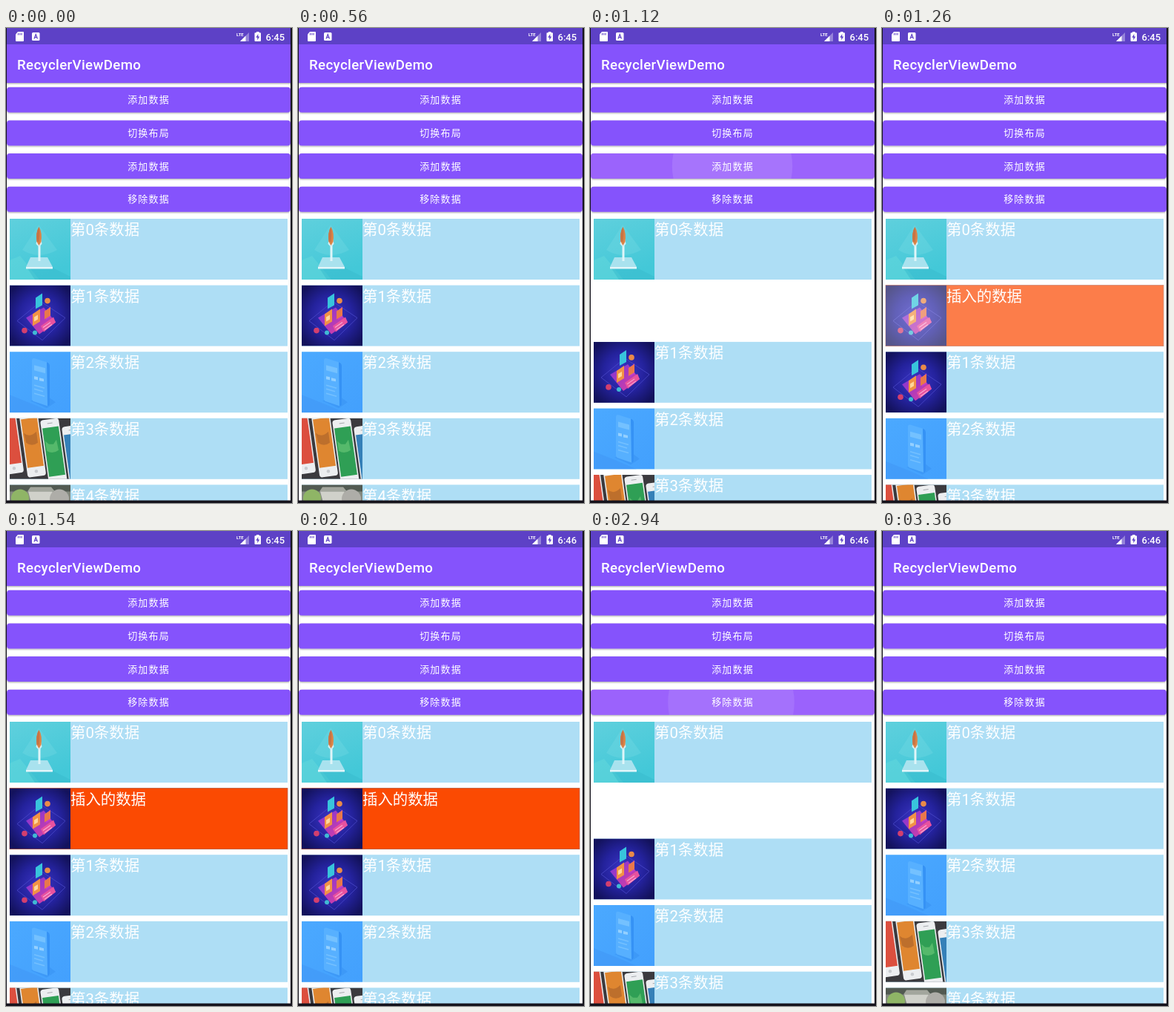
Animation, 386 px wide and 640 px high, one loop 3.43 s. Source, as an HTML page:

```html
<!DOCTYPE html>
<html lang="zh-CN">
<head>
<meta charset="utf-8">
<title>RecyclerViewDemo</title>
<style>
  html, body { margin: 0; width: 100%; height: 100%; overflow: hidden; background: #fff; }
  svg { display: block; width: 386px; height: 640px; }
  text { fill: #fff; font-family: Roboto, "Noto Sans CJK SC", "Noto Sans CJK", sans-serif; }
  .title { font-size: 18.7px; font-weight: 500; letter-spacing: .36px; }
  .label { font-size: 13px; font-weight: 500; letter-spacing: 1.16px; text-anchor: middle; }
  .row { font-size: 20.4px; }
  .clock { font-size: 13px; font-weight: 500; }
</style>
</head>
<body>
<svg viewBox="0 0 386 640" xmlns="http://www.w3.org/2000/svg">
  <defs>
    <filter id="lift" x="-5%" y="-30%" width="110%" height="180%">
      <feDropShadow dx="0" dy="1" stdDeviation="1" flood-color="#000" flood-opacity=".36"/>
    </filter>
    <filter id="soft" x="-5%" y="-40%" width="110%" height="200%"><feGaussianBlur stdDeviation="2.6"/></filter>
    <clipPath id="buttonClip"><rect x="1" width="383" height="34" rx="4"/></clipPath>
    <clipPath id="thumbClip"><rect width="82" height="82"/></clipPath>
    <linearGradient id="teal" x2=".4" y2="1"><stop stop-color="#5fd0dd"/><stop offset="1" stop-color="#43c8d8"/></linearGradient>
    <radialGradient id="night" r=".62"><stop stop-color="#3c36c8"/><stop offset=".55" stop-color="#24229c"/><stop offset="1" stop-color="#13125c"/></radialGradient>
    <linearGradient id="sky" x2="1" y2="1"><stop stop-color="#4ba9ff"/><stop offset="1" stop-color="#43a0fd"/></linearGradient>
    <linearGradient id="pink" x2="1" y2="1"><stop stop-color="#7a35d8"/><stop offset="1" stop-color="#e2409f"/></linearGradient>

    <g id="thumb0">
      <rect width="82" height="82" fill="url(#teal)"/>
      <path d="M0 56L14 50L40 82H0Z" fill="#62d8dc" opacity=".6"/>
      <path d="M39 8L64 42Q39 56 17 42Z" fill="#7adbe3" opacity=".3"/>
      <path d="M58 66L82 78V82H34L24 67Z" fill="#38bccd" opacity=".5"/>
      <path d="M28 52H51L58 65H22Z" fill="#a9e2ee"/>
      <path d="M22 65H58V67.5H22Z" fill="#e3f6fa"/>
      <path d="M38.500 36H41.500V57H38.500Z" fill="#dff5f8"/>
      <path d="M35.500 34L37 26H42L43.500 34L39.500 38Z" fill="#d5eff3"/>
      <path d="M39.500 11Q44 18 42.500 31L39.500 36L36.500 31Q35 18 39.500 11Z" fill="#dc8345"/>
      <path d="M39.500 11Q41 16 39.500 31H36.500Q35 18 39.500 11Z" fill="#c77445"/>
    </g>

    <g id="thumb1">
      <rect width="82" height="82" fill="url(#night)"/>
      <path d="M10 48L42 22L75 44L44 74Z" fill="none" stroke="#4b49c9" stroke-width=".8"/>
      <path d="M22 44L46 30L62 50L40 66Z" fill="url(#pink)"/>
      <path d="M42 55L59 43L62 50L46 63Z" fill="#e8529f"/>
      <path d="M49 34L55 29V43L49 47Z" fill="#c23ccf"/>
      <path d="M35 17L44 11V27L35 32Z" fill="#38c4dc"/>
      <path d="M31 39L41 32V49L31 55Z" fill="#f29245"/>
      <path d="M47 35L55 30V41L47 46Z" fill="#e9784b"/>
      <path d="M33 43L38 40V46L33 49Z" fill="#ffd79a"/>
      <path d="M45 57L55 50M47 60L57 53" stroke="#f6a8d2" stroke-width="1.200"/>
      <circle cx="51" cy="21" r="3.800" fill="#e98a48"/>
      <circle cx="20" cy="61" r="3.800" fill="#d33f6e"/>
      <circle cx="34" cy="64" r="3" fill="#40b9d4"/>
    </g>

    <g id="thumb2">
      <rect width="82" height="82" fill="url(#sky)"/>
      <path d="M0 58L30 70L58 82H0Z" fill="#4096f5" opacity=".5"/>
      <path d="M28 66L50 76L62 68L54 62Z" fill="#3a93f3" opacity=".6"/>
      <path d="M30 12Q30 8 34 9L50 14Q54 15 54 19V71Q54 74 51 73L33 67Q30 66 30 63Z" fill="#57b0ff"/>
      <path d="M50 14Q54 15 54 19V71Q54 74 51 73Z" fill="#3592f5"/>
      <path d="M33 18L48 22V29L33 25Z" fill="#74c1ff"/>
      <path d="M33 33L38 34V38L33 37ZM40 35L46 36.500V40L40 39Z" fill="#94d0ff"/>
      <path d="M33 45L47 49M33 50L45 53.500M33 56L47 60" stroke="#74c0ff" stroke-width="1.500"/>
    </g>

    <g id="phone">
      <rect width="25" height="90" rx="4" fill="#eceef0"/>
      <rect x="1.500" y="11" width="22" height="66"/>
      <path d="M9 5.500H16" stroke="#a5a8ad"/>
      <circle cx="12.500" cy="83" r="2.300" fill="#c9ccd0"/>
    </g>
    <g id="thumb3">
      <rect width="82" height="82" fill="#3b3a3e"/>
      <use href="#phone" transform="translate(-18 -13) rotate(-8)" fill="#dc4f3e"/>
      <use href="#phone" transform="translate(12 -9) rotate(-8)" fill="#df8630"/>
      <use href="#phone" transform="translate(41 3) rotate(-8)" fill="#2f9f55"/>
      <use href="#phone" transform="translate(70 12) rotate(-8)" fill="#3580b8"/>
      <path d="M19 20Q27 27 36 18L38 33Q30 39 22 33Z" fill="#bd6f2c"/>
      <path d="M48 31L53 35H59L63 29L66 43Q58 49 50 44Z" fill="#55b96b"/>
    </g>

    <g id="thumb4">
      <rect width="82" height="82" fill="#83897f"/>
      <path d="M0 0H82V9H0Z" fill="#525a52"/>
      <path d="M28 3H56L61 9H24Z" fill="#a3a69d"/>
      <path d="M25 9H58L54 24H29Z" fill="#d0d1ca"/>
      <circle cx="14" cy="18" r="12" fill="#8fb566"/>
      <circle cx="67" cy="19" r="13" fill="#aeada8"/>
    </g>
  </defs>

  <rect width="386" height="640" fill="#fff"/>
  <g id="list"></g>
  <g id="buttons"></g>

  <rect y="20" width="386" height="54" fill="#8552fc" filter="url(#lift)"/>
  <rect width="386" height="22" fill="#5d41c6"/>
  <text class="title" x="15" y="55.500">RecyclerViewDemo</text>

  <path d="M16 5H23Q24 5 24 6V17Q24 18 23 18H14Q13 18 13 17V8.500Z" fill="#fff"/>
  <path d="M16.500 7V9.500M18.800 7V9.500M21.100 7V9.500" stroke="#5d41c6" stroke-width="1.100"/>
  <rect x="35" y="6" width="10.500" height="11" rx="1.500" fill="#fff"/>
  <path d="M38 14.500L40.250 8.500L42.500 14.500M38.800 12.700H41.700" fill="none" stroke="#5d41c6" stroke-width="1.200"/>
  <text x="311" y="11" font-size="6" font-weight="700">LTE</text>
  <path d="M328 6V18H316Z" fill="#fff" opacity=".35"/>
  <path d="M323.500 10.500V18H316Z" fill="#fff"/>
  <path d="M338 5H341.500V6.300H343Q344 6.300 344 7.300V17Q344 18 343 18H336.500Q335.500 18 335.500 17V7.300Q335.500 6.300 336.500 6.300H338Z" fill="#fff"/>
  <path d="M340.300 8L337.300 12.700H339.300V16.300L342.300 11.500H340.300Z" fill="#5d41c6"/>
  <text class="clock" id="clock" x="350.500" y="16.500"></text>

  <path d="M0 0H1V640H0ZM384 0H386V640H384ZM0 636.500H386V640H0Z" fill="#15131c"/>
</svg>

<script>
  const LOOP = 3430, STEP = 70;
  const TOP = 257, PITCH = 89.6;
  const INSERT_CLICK = 933, REMOVE_CLICK = 2738, CLOCK_TICK = 2100;
  const MOVE = 250, FADE = 120;

  const $ = id => document.getElementById(id);
  const clamp = x => Math.min(1, Math.max(0, x));
  const ramp = (t, from, to) => clamp((t - from) / (to - from));
  const ease = x => (1 - Math.cos(Math.PI * x)) / 2;

  const row = (id, label, thumb, color, edge = 'none') => `
    <g id="${id}">
      <rect x="5" width="375" height="82" fill="${color}" stroke="${edge}" stroke-width=".8"/>
      <g transform="translate(5 0)" clip-path="url(#thumbClip)"><use href="#thumb${thumb}"/></g>
      <text class="row" x="87" y="22.300">${label}</text>
    </g>`;

  $('list').innerHTML = row('inserted', '插入的数据', 1, '#fb4a02', '#b8583c') +
    [0, 1, 2, 3, 4].map(i => row('row' + i, `第${i}条数据`, i, '#aedef5')).join('');

  $('buttons').innerHTML = ['添加数据', '切换布局', '添加数据', '移除数据'].map((label, i) => `
    <g transform="translate(0 ${79.7 + 44.7 * i})">
      <rect id="raise${i}" x="1" y="4" width="383" height="35" rx="4" filter="url(#soft)" opacity="0"/>
      <rect x="1" width="383" height="34" rx="4" fill="#8552fc" filter="url(#lift)"/>
      <g clip-path="url(#buttonClip)">
        <rect id="press${i}" width="386" height="34" fill="#c882fc" opacity="0"/>
        <circle id="ripple${i}" cy="17" fill="#fff" opacity="0"/>
      </g>
      <text class="label" x="192.500" y="21.700">${label}</text>
    </g>`).join('');

  const place = (id, y) => $(id).setAttribute('transform', `translate(0 ${y})`);
  const fade = (id, alpha) => $(id).setAttribute('opacity', alpha);

  // t is measured from the moment the finger lifts
  function drawPress(i, t, x) {
    fade('raise' + i, .3 * ramp(t, -120, -80) * (1 - ramp(t, -20, 80)));
    fade('press' + i, .33 * ramp(t, -70, 10) * (1 - ramp(t, 200, 350)));
    fade('ripple' + i, .22 * ramp(t, -70, 0) * (1 - ramp(t, 60, 310)));
    $('ripple' + i).setAttribute('cx', x);
    $('ripple' + i).setAttribute('r', Math.max(0, 43 + (t - 47) * .273));
  }

  function draw(t) {
    const opened = ease(ramp(t, INSERT_CLICK, INSERT_CLICK + MOVE));
    const closed = ease(ramp(t, REMOVE_CLICK + FADE, REMOVE_CLICK + FADE + MOVE));
    const shift = (opened - closed) * PITCH;
    for (let i = 0; i < 5; i++) place('row' + i, TOP + PITCH * i + (i ? shift : 0));

    place('inserted', TOP + PITCH);
    const shown = INSERT_CLICK + MOVE;
    fade('inserted', ease(ramp(t, shown, shown + FADE)) *
      (1 - ease(ramp(t, REMOVE_CLICK, REMOVE_CLICK + FADE))));

    drawPress(2, t - INSERT_CLICK, 192);
    drawPress(3, t - REMOVE_CLICK, 190.5);
    $('clock').textContent = t < CLOCK_TICK ? '6:45' : '6:46';
  }

  const start = performance.now();
  function tick() {
    const t = (performance.now() - start) % LOOP;
    draw(Math.floor(t / STEP) * STEP);
    requestAnimationFrame(tick);
  }
  tick();
</script>
</body>
</html>
```
